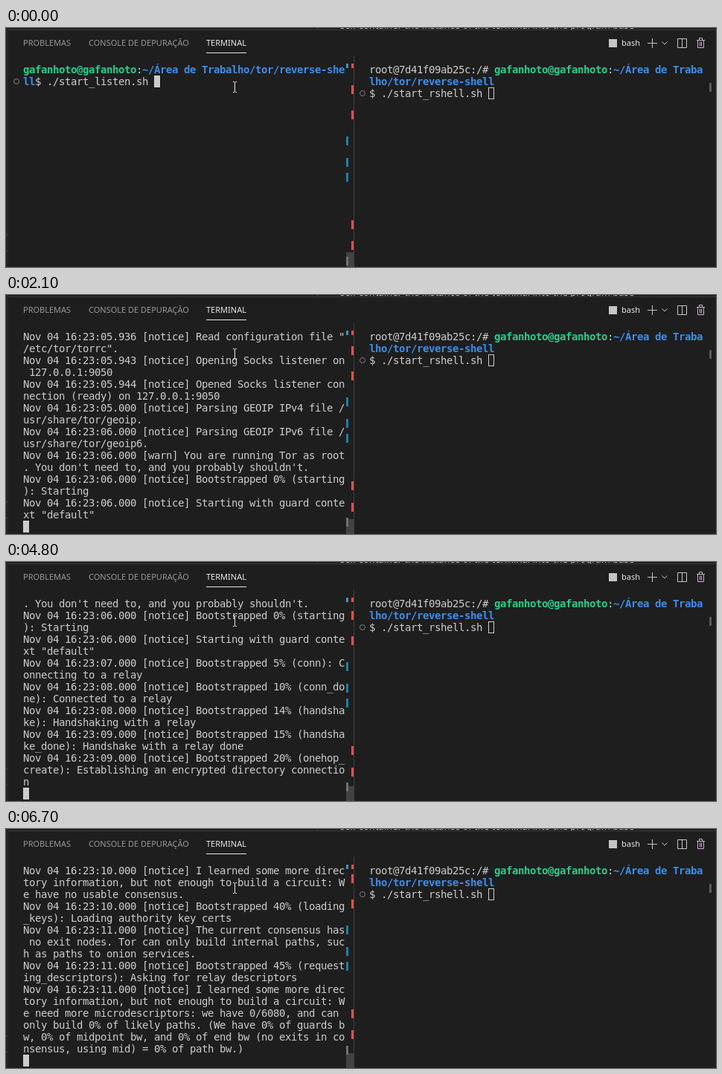
Recreate the animation shown at these times as an HTML page. Size 954 px wide and 322 px high, loop 8 s.

```html
<!DOCTYPE html>
<html lang="pt-BR">
<head>
<meta charset="utf-8">
<title>Terminal</title>
<style>
  html, body { margin: 0; width: 100%; height: 100%; overflow: hidden; background: #1e1e1e; }
  #stage { position: relative; width: 954px; height: 322px; overflow: hidden; background: #1e1e1e; }
  #stage > *, .mark { position: absolute; }
  .tab, .peek { font: 11px/16px "Noto Sans", "Open Sans", sans-serif; white-space: pre; color: #979797; top: 12px; }
  .on { color: #e7e7e7; }
  .peek { left: 449px; top: -12px; height: 14px; overflow: hidden; font-size: 13px; color: #c8c8c8; }
  .pane { top: 48px; margin: 0; font: 14px/16px "DejaVu Sans Mono", monospace; color: #ccc; white-space: pre; }
  .pane b { color: #3b8eea; }
  .pane b.user { color: #23d18b; }
  #caret { width: 8px; height: 16px; background: #ccc; }
  #box { left: 648px; top: 80px; width: 6px; height: 14px; border: 1px solid #ccc; }
  .ring { width: 6px; height: 6px; border: 1px solid #7d7d7d; border-radius: 50%; }
  .mark { width: 3px; height: 12px; }
  svg { left: 0; top: 0; }
</style>
</head>
<body>
<div id="stage">
  <div class="peek">self container the instance of the terminal into the program base</div>
  <span class="tab" style="left:23px">PROBLEMAS</span>
  <span class="tab" style="left:111px">CONSOLE DE DEPURAÇÃO</span>
  <span class="tab on" style="left:269px">TERMINAL</span>
  <span class="tab on" style="left:827px">bash</span>

  <svg width="954" height="322" fill="none" stroke="#c5c5c5">
    <g stroke="none">
      <path fill="#252526" d="M0 0h3v322h-3z"/>
      <path fill="#3c3c3c" d="M3 2h951v1H3zM418 0h1v2h-1zM0 278h3v1H0zM0 300h3v1H0z"/>
      <path fill="#e7e7e7" d="M269 33h54v1h-54z"/>
      <path fill="#414141" d="M467 37h1v285h-1z"/>
      <path fill="#424242" d="M457 302h10v20h-10z"/>
      <path fill="#5a5a5a" d="M945 74h3v12h-3z"/>
      <path fill="#c5c5c5" d="M810 15h11v11h-11z"/>
    </g>
    <path d="M862 20.5h13M868.5 14v13"/>
    <path d="M881.5 18.5l3.5 3.5 3.5-3.5"/>
    <path d="M902.5 14.5h12v12h-12zM908.5 14.5v12"/>
    <path stroke="#cdb0d0" d="M928 16.5h11M931.5 16v-2.5h4V16M929.5 17v9.5h8V17M932.5 18.5v6M934.5 18.5v6"/>
  </svg>

  <div id="marks"></div>
  <pre class="pane" id="left" style="left:23px"></pre>
  <pre class="pane" id="right" style="left:488px"></pre>
  <div id="caret"></div>
  <div id="box"></div>
  <div class="ring" id="ring" style="left:10px;top:68px"></div>
  <div class="ring" style="left:475px;top:84px"></div>
  <svg width="954" height="322" fill="none" stroke="#e8e8e8">
    <path d="M305 72.5h2M308 72.5h2M307.5 73v13M305 86.5h2M308 86.5h2"/>
  </svg>
</div>

<script>
const LOOP = 8000, COLS = 54, ROWS = 17, CELL = 8, LINE = 16;
const LEFT = 23, TOP = 48;
const $ = id => document.getElementById(id);

const USER = '<b class="user">gafanhoto@gafanhoto</b>';
const PROMPT = [USER + ':<b>~/Área de Trabalho/tor/reverse-she</b>', '<b>ll</b>$ ./start_listen.sh '];
$('right').innerHTML = 'root@7d41f09ab25c:/# ' + USER + ':<b>~/Área de Traba\nlho/tor/reverse-shell</b>\n$ ./start_rshell.sh ';

const log = (time, text, level = 'notice') => `Nov 04 16:23:${time} [${level}] ${text}`;
const boot = (time, text) => log(time, 'Bootstrapped ' + text);
const noCircuit = 'I learned some more directory information, but not enough to build a circuit: We ';

const build = [
  ['RUN apt-get update', '91c7be20d4f3'],
  ['RUN apt-get install -y tor socat', '5ea80c3b96d1'],
  ['COPY torrc /etc/tor/torrc', 'c02f7d618ae5'],
  ['COPY start.sh /start.sh', '48d9e1f3b07a'],
  ['CMD ["/bin/bash", "/start.sh"]', 'e63a5b09c7f2'],
].flatMap(([cmd, id], i) => [`Step ${i + 2}/6 : ${cmd}`, ' ---> Using cache', ` ---> ${id}`]);

// Output printed at each moment, in ms.
const output = [
  [500, ['Sending build context to Docker daemon  5.632kB']],
  [600, ['Step 1/6 : FROM ubuntu:22.04', ' ---> a8780b506fa4', ...build,
    'Successfully built e63a5b09c7f2', 'Successfully tagged listen-tor/socat:latest']],
  [1400, [
    log('05.936', 'Tor 0.4.6.10 running on Linux with Libevent 2.1.12-stable, OpenSSL 3.0.2, Zlib 1.2.11, Liblzma 5.2.5, Libzstd 1.4.8 and Glibc 2.35 as libc.'),
    log('05.936', "Tor can't help you if you use it wrong! Learn how to be safe at https://support.torproject.org/faq/staying-anonymous/"),
    log('05.936', 'Read configuration file "/etc/tor/torrc".'),
    log('05.943', 'Opening Socks listener on 127.0.0.1:9050'),
    log('05.944', 'Opened Socks listener connection (ready) on 127.0.0.1:9050'),
    log('05.000', 'Parsing GEOIP IPv4 file /usr/share/tor/geoip.')]],
  [1700, [log('06.000', 'Parsing GEOIP IPv6 file /usr/share/tor/geoip6.')]],
  [2100, [
    log('06.000', "You are running Tor as root. You don't need to, and you probably shouldn't.", 'warn'),
    boot('06.000', '0% (starting): Starting'),
    log('06.000', 'Starting with guard context "default"')]],
  [3300, [boot('07.000', '5% (conn): Connecting to a relay')]],
  [4400, [
    boot('08.000', '10% (conn_done): Connected to a relay'),
    boot('08.000', '14% (handshake): Handshaking with a relay')]],
  [4800, [
    boot('09.000', '15% (handshake_done): Handshake with a relay done'),
    boot('09.000', '20% (onehop_create): Establishing an encrypted directory connection')]],
  [5000, [boot('09.000', '25% (requesting_status): Asking for networkstatus consensus')]],
  [5200, [boot('09.000', '30% (loading_status): Loading networkstatus consensus')]],
  [6200, [log('10.000', noCircuit + 'have no usable consensus.')]],
  [6300, [boot('10.000', '40% (loading_keys): Loading authority key certs')]],
  [6700, [
    log('11.000', 'The current consensus has no exit nodes. Tor can only build internal paths, such as paths to onion services.'),
    boot('11.000', '45% (requesting_descriptors): Asking for relay descriptors'),
    log('11.000', noCircuit + 'need more microdescriptors: we have 0/6080, and can only build 0% of likely paths. (We have 0% of guards bw, 0% of midpoint bw, and 0% of end bw (no exits in consensus, using mid) = 0% of path bw.)')]],
];

const wrap = text => text.match(new RegExp(`.{1,${COLS}}`, 'g'));
const states = [{ at: 0, lines: PROMPT }];
for (const [at, texts] of output) {
  states.push({ at, lines: [...states.at(-1).lines, ...texts.flatMap(wrap)] });
}

// Overview ruler: the marks creep up as old lines leave the full scrollback.
const RED = '#f14c4c', BLUE = '#1b81a8', SHIFT = 272 / 1017;
const marks = [
  ...[76.7, 110.7, 258.7, 287.3].map(y => [464, y, RED]),
  ...[146, 174.8, 195].map(y => [457, y, BLUE]),
  [457, 307.7, '#707070'],
].map(([x, y, color]) => ({ y, el: addMark(x, color) }));
for (const [x, color] of [[457, '#3f94bb'], [464, RED]]) {
  Object.assign(addMark(x, color).style, { top: TOP + 'px', height: '6px' });
}

function addMark(x, color) {
  const el = document.createElement('div');
  el.className = 'mark';
  el.style.left = x + 'px';
  el.style.background = color;
  return $('marks').appendChild(el);
}

// Snap the monospace advance to the whole-pixel terminal grid.
function snapGrid() {
  const probe = document.createElement('span');
  probe.className = 'pane';
  probe.textContent = 'x'.repeat(100);
  $('stage').append(probe);
  const gap = CELL - probe.getBoundingClientRect().width / 100;
  probe.remove();
  for (const id of ['left', 'right']) $(id).style.letterSpacing = gap + 'px';
}

function draw({ at, lines }) {
  const row = at ? lines.length : 1;
  const scroll = Math.max(0, row - ROWS + 1);
  $('left').innerHTML = lines.slice(scroll).join('\n');
  $('caret').style.left = LEFT + (at ? 0 : 22 * CELL) + 'px';
  $('caret').style.top = TOP + (row - scroll) * LINE + 'px';
  $('ring').style.display = scroll ? 'none' : '';
  for (const { y, el } of marks) el.style.top = Math.round(y - scroll * SHIFT) + 'px';
}

let shown;
function tick() {
  const t = performance.now() % LOOP;
  const state = states.findLast(s => s.at <= t);
  if (state !== shown) draw(shown = state);
  requestAnimationFrame(tick);
}
snapGrid();
tick();
</script>
</body>
</html>
```
